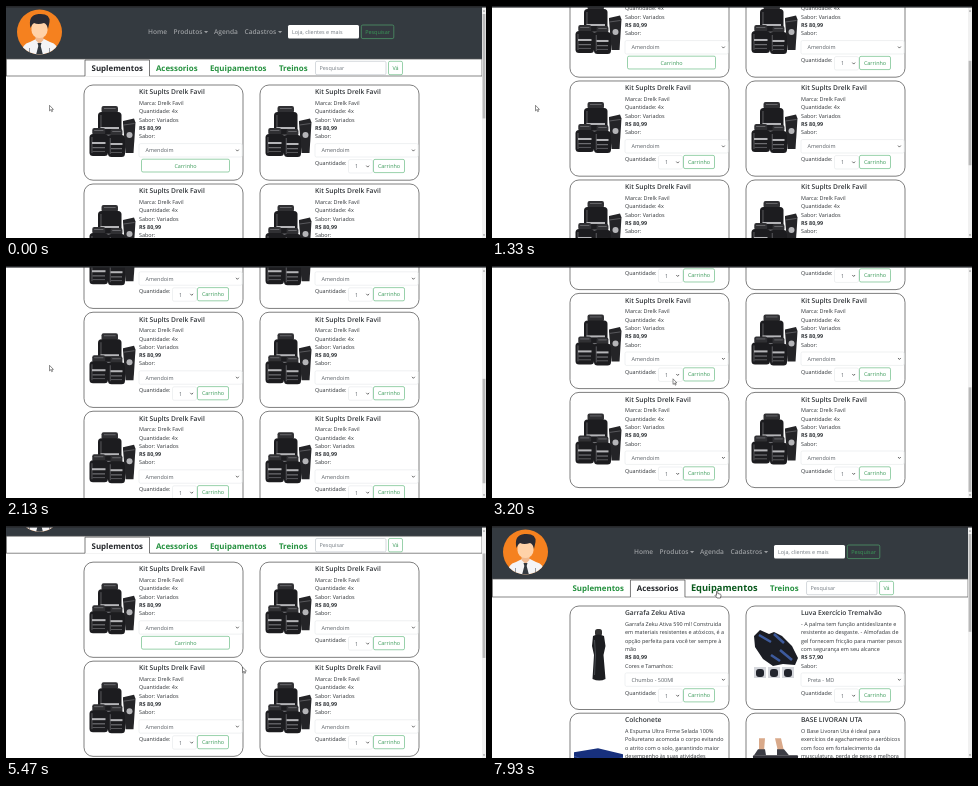
An HTML page for the animation above (8000 ms loop, 480x232 px).

```html
<!DOCTYPE html>
<html lang="pt">
<head>
<meta charset="utf-8">
<style>
  html, body { margin: 0; height: 100%; overflow: hidden; background: #fff; }
  svg { display: block; width: 100vw; height: 100vh; }
  text { font: 5.45px "Open Sans", "Noto Sans", sans-serif; fill: #303438; text-rendering: geometricPrecision; white-space: pre; }
  .title { font-size: 6.7px; font-weight: 600; }
  .bold { font-weight: 700; }
  .menu { font-size: 6.6px; font-weight: 600; fill: #9a9da0; }
  .tab { font-size: 7.9px; font-weight: 700; fill: #25913f; text-anchor: middle; }
  .tab.active { fill: #25282c; }
  .tab.hover { font-size: 9.3px; fill: #0b5a1e; }
  .button { fill: #3a9a58; text-anchor: middle; }
  .muted { fill: #747c83; }
  .field { fill: #595f65; }
</style>
</head>
<body>
<svg id="stage" viewBox="0 0 480 232"></svg>
<script>
const LOOP = 8000, STEP = 1000 / 15;
const stage = document.getElementById('stage');

// Drawing helpers; text y is the middle of the line.
const text = (x, y, s, cls = '') => `<text x="${x}" y="${y + 2}" class="${cls}">${s}</text>`;
const rect = (x, y, w, h, fill, r = 0, stroke = 'none', width = 0.6) =>
  `<rect x="${x}" y="${y}" width="${w}" height="${h}" rx="${r}" fill="${fill}" stroke="${stroke}" stroke-width="${width}"/>`;
const path = (d, fill, stroke = 'none', width = 0.7) =>
  `<path d="${d}" fill="${fill}" stroke="${stroke}" stroke-width="${width}"/>`;
const circle = (x, y, r, fill) => `<circle cx="${x}" cy="${y}" r="${r}" fill="${fill}"/>`;
const group = (x, y, body) => `<g transform="translate(${x} ${y})">${body}</g>`;

const button = (x, y, w, h, label, fill = '#fff') =>
  rect(x, y, w, h, fill, 1.5, '#55b273') + text(x + w / 2, y + h / 2, label, 'button');
const select = (x, y, w, label) =>
  rect(x, y, w, 13.4, '#fff', 1.5, '#dfe2e5', 0.5) + text(x + 6.5, y + 6.8, label, 'field') +
  path(`M${x + w - 6.2} ${y + 6}l1.4 1.5l1.4-1.5`, 'none', '#444', 0.8);

// Product pictures, relative to the top left of a card.
const tub = (x, y, w, h) =>
  rect(x + w * 0.15, y, w * 0.7, 7, '#303033', 2) + rect(x + w * 0.25, y + 2, w * 0.5, 1, '#66666a') +
  rect(x, y + 6, w, h - 6, '#1c1c1f', 3.5) + rect(x + w * 0.1, y + 9, 1.2, h - 12, '#505054') +
  rect(x + 2.5, y + h * 0.5, w - 5, 2, '#b5b5b8') + rect(x + 3, y + h * 0.68, w - 6, 1.2, '#6f6f73') +
  rect(x + 3, y + h * 0.82, w - 6, 0.9, '#5f5f63');
const supplements =
  tub(14, 21, 23.5, 42) + path('M39 36l11-2.500l1.500 4l-2 30.500h-8l-2.500-30z', '#242427') +
  path('M39.500 40l11-1.500', 'none', '#707074') + circle(45.5, 50, 3, '#b5b5b8') +
  tub(5.5, 43, 18.5, 28) + tub(24, 44, 17, 28);
const bottle =
  rect(25, 23, 7, 7, '#333', 2.5) + path('M23 30q5-3 11 0l1.500 10l-2 9l2 24q-6 3-13 0l1.500-24l-2-9z', '#1c1d20') +
  path('M24.500 34l1 15l-1 20', 'none', '#55585d', 0.8);
const glove =
  path('M8 30l6-6l9 4l5-2l8 4l10 10l6 12l-3 7l-12-1l-10 2l-10-7l-8-12z', '#1b1d24') +
  path('M13 29l12 7M28 28l10 9M34 44l12 10M25 49l9 6', 'none', '#3d5a9c', 2.6) +
  [0, 1, 2].map(i => rect(8 + i * 14, 61, 12, 11, '#d5d7dc') + rect(10 + i * 14, 63, 8, 8, '#22252d', 3)).join('');
const mat = path('M4 39l24-4l25 6v12l-24 9l-25-12z', '#17307d') + path('M4 43l25 9l24-8', 'none', '#4864ac');
const legs =
  path('M13 25h6l-1 13h-5zM29 25h6l3 13h-6z', '#d9a98a') +
  path('M12 36h7l1 6h-12zM31 36h7l5 6h-12z', '#3c3d45') + rect(7, 42, 45, 9, '#303038', 1);

// One card: title, text lines, price and a last label above the select.
const card = (c, x, y, index) => {
  const lines = [...c.lines, c.price, c.label];
  const top = 18 + 8.3 * (lines.length - 1) + 7.4;
  const single = c.single && index === 0;
  return group(x, y,
    rect(0, 0, 159, top + 36.6, '#fff', 9, '#484848', 0.7) + c.picture + text(55, 7.3, c.title, 'title') +
    lines.map((s, i) => text(55, 18 + 8.3 * i, s, s === c.price ? 'bold' : '')).join('') +
    select(55, top, 103.2, c.option) +
    (single ? button(57.5, top + 15.6, 88, 12.8, 'Carrinho')
            : text(55, top + 19.6, 'Quantidade:') + select(88.5, top + 16, 24, '1') +
              button(113.5, top + 15.8, 31, 13.2, 'Carrinho')));
};
const page = (cards, pitch) => ({
  height: 84 + pitch * 4,
  body: Array.from({ length: 8 }, (_, i) =>
    card(cards[i % cards.length], 78 + i % 2 * 176, 79 + (i >> 1) * pitch, i)).join('')
});

const kit = {
  title: 'Kit Suplts Drelk Favil', picture: supplements, price: 'R$ 80,99', label: 'Sabor:', option: 'Amendoim', single: true,
  lines: ['Marca: Drelk Favil', 'Quantidade: 4x', 'Sabor: Variados']
};
const accessories = [
  { title: 'Garrafa Zeku Ativa', picture: bottle, price: 'R$ 80,99', label: 'Cores e Tamanhos:', option: 'Chumbo - 500Ml',
    lines: ['Garrafa Zeku Ativa 590 ml! Construida', 'em materiais resistentes e atóxicos, é a',
      'opção perfeita para você ter sempre à', 'mão'] },
  { title: 'Luva Exercício Tremalvão', picture: glove, price: 'R$ 57,90', label: 'Sabor:', option: 'Preta - MD',
    lines: ['- A palma tem função antideslizante e', 'resistente ao desgaste. - Almofadas de',
      'gel fornecem fricção para manter pesos', 'com segurança em seu alcance'] },
  { title: 'Colchonete', picture: mat, price: 'R$ 80,99', label: 'Cores:', option: 'Azul',
    lines: ['A Espuma Ultra Firme Selada 100%', 'Poliuretano acomoda o corpo evitando',
      'o atrito com o solo, garantindo maior', 'desempenho às suas atividades'] },
  { title: 'BASE LIVORAN UTA', picture: legs, price: 'R$ 57,90', label: 'Cores:', option: 'Preta',
    lines: ['O Base Livoran Uta é ideal para', 'exercícios de agachamento e aeróbicos',
      'com foco em fortalecimento da', 'musculatura, perda de peso e melhora'] }
];
const pages = [page([kit], 99), page(accessories, 107.2)];

const avatar =
  '<clipPath id="disc"><circle cx="33.5" cy="26" r="22.5"/></clipPath>' + circle(33.5, 26, 22.5, '#f5811f') +
  '<g clip-path="url(#disc)">' +
  path('M15 50q0-12 9-14l6-3h8l6 3q9 2 9 14z', '#f4f4f6') + path('M29.500 29h8v5l-4 4l-4-4z', '#f0b98f') +
  rect(25.5, 14, 16, 18, '#ffd2a8', 7.5) +
  path('M24.500 22q-3-13 8-14q12-1 11 8l-1.500 7q-1-5-4-6q-6 2-10 0q-2 1-3.500 5z', '#2b2b33') +
  path('M31.500 37h4l-.8 3l2.300 9h-7l2.300-9z', '#343a40') +
  path('M23.500 42v8M43.500 42v8', 'none', '#7d8187', 0.8) + '</g>';
const caret = x => path(`M${x} 25h4.200l-2.100 2.300z`, '#9a9da0');
const navbar = rect(0, 0, 476, 53, '#343a40') + avatar +
  text(142, 26, 'Home', 'menu') + text(167.5, 26, 'Produtos', 'menu') + caret(198) +
  text(208, 26, 'Agenda', 'menu') + text(238.5, 26, 'Cadastros', 'menu') + caret(272) +
  rect(282, 19, 71, 13.6, '#fff', 1.5) + text(286, 26, 'Loja, clientes e mais', 'muted') +
  button(355.3, 19, 32.5, 13.6, 'Pesquisar', 'none');

const tabs = [['Suplementos', 64.5], ['Acessorios', 54.5], ['Equipamentos', 68.5], ['Treinos', 41.5]];
const grown = 0.18, padding = 12.5;

// The tab row is centred, so a hovered tab pushes its neighbours both ways.
function tabBar(active, hover) {
  const extra = hover < 0 ? 0 : (tabs[hover][1] - padding) * grown;
  const bottom = hover < 0 ? 70 : 71;
  let x = 79 - extra / 2;
  let out = rect(0.4, 53, 475.6, bottom - 53, '#fff', 0, '#555', 0.7);
  tabs.forEach(([name, base], i) => {
    const w = base + (i === hover ? extra : 0);
    if (i === active) out += rect(x, 54, w, bottom - 53.3, '#fff') + path(`M${x} ${bottom}V54h${w}V${bottom}`, 'none', '#444');
    out += text(x + w / 2, 63.4, name, `tab${i === active ? ' active' : ''}${i === hover ? ' hover' : ''}`);
    x += w;
  });
  return out + rect(x + 1.5, 55.3, 70.5, 13.4, '#fff', 1.5, '#b9c0c6') + text(x + 5.5, 62.3, 'Pesquisar', 'muted') +
    button(x + 74.5, 55.3, 14, 13.4, 'Vá');
}

function scrollbar(scroll, height) {
  const scale = 218 / height;
  return rect(476, 1.5, 4, 231, '#f1f1f1') + rect(476.6, 8 + scroll * scale, 2.8, 230 * scale, '#b9b9b9') +
    path('M477 5.500l1-1.500l1 1.500zM477 228.500l1 1.500l1-1.500z', '#777');
}

const arrow = path('M0 0v5.600l1.300-1.200l.9 2l.9-.4l-.9-1.900h1.700z', '#fff', '#444', 0.6);
const hand = path('M0 .5q.7-.8 1.300 0v2l2.600.7q.8.300.6 1.300l-.5 2.500h-3.400l-2-2.600q.2-.9 1.400-.1z', '#fff', '#222', 0.6);

// Keys are [time, values...].
const scrollKeys = [[0, 0], [267, 0], [733, 48], [1000, 70], [1133, 70], [1867, 191], [2000, 212], [2267, 249.6],
  [5267, 249.6], [5467, 42.5], [5667, 0], [LOOP, 0]];
const cursorKeys = [[0, 43.5, 99.3], [2533, 43.5, 99.3], [3200, 181, 112.8], [3400, 284, 179], [3667, 172, 104],
  [4000, 172, 104], [4500, 180, 170], [4867, 218, 202], [5067, 236.5, 141], [5933, 236.5, 141], [6733, 190, 68],
  [6933, 180.5, 66], [7067, 180.5, 66], [7867, 212, 64], [7933, 224.5, 65], [LOOP, 224.5, 65]];
const switchTime = 7190;

function valueAt(keys, t) {
  const i = Math.max(1, keys.findIndex(k => k[0] >= t));
  const [a, b] = [keys[i - 1], keys[i]];
  const p = (t - a[0]) / (b[0] - a[0]);
  return a.slice(1).map((v, j) => v + (b[j + 1] - v) * p);
}

function hoveredTab(x, y, scroll) {
  if (scroll > 0 || y < 54 || y > 70) return -1;
  let left = 79;
  return tabs.findIndex(([, w]) => x >= left && x < (left += w));
}

function scene(t) {
  const [scroll] = valueAt(scrollKeys, t);
  const [x, y] = valueAt(cursorKeys, t);
  const active = t < switchTime ? 0 : 1;
  const hover = hoveredTab(x, y, scroll);
  const { body, height } = pages[active];
  return rect(0, 0, 480, 232, '#fff') +
    group(0, -scroll, group(0, hover < 0 ? 0 : 1, body) + navbar + tabBar(active, hover)) +
    scrollbar(scroll, height) + rect(0, 0, 480, 1.6, '#26282b') +
    group(x, y, hover < 0 ? arrow : hand);
}

let shown = -1;
function draw() {
  const step = Math.floor((performance.now() % LOOP + 5) / STEP) % (LOOP / STEP);
  if (step !== shown) stage.innerHTML = scene(step * STEP);
  shown = step;
  requestAnimationFrame(draw);
}
draw();
</script>
</body>
</html>
```
